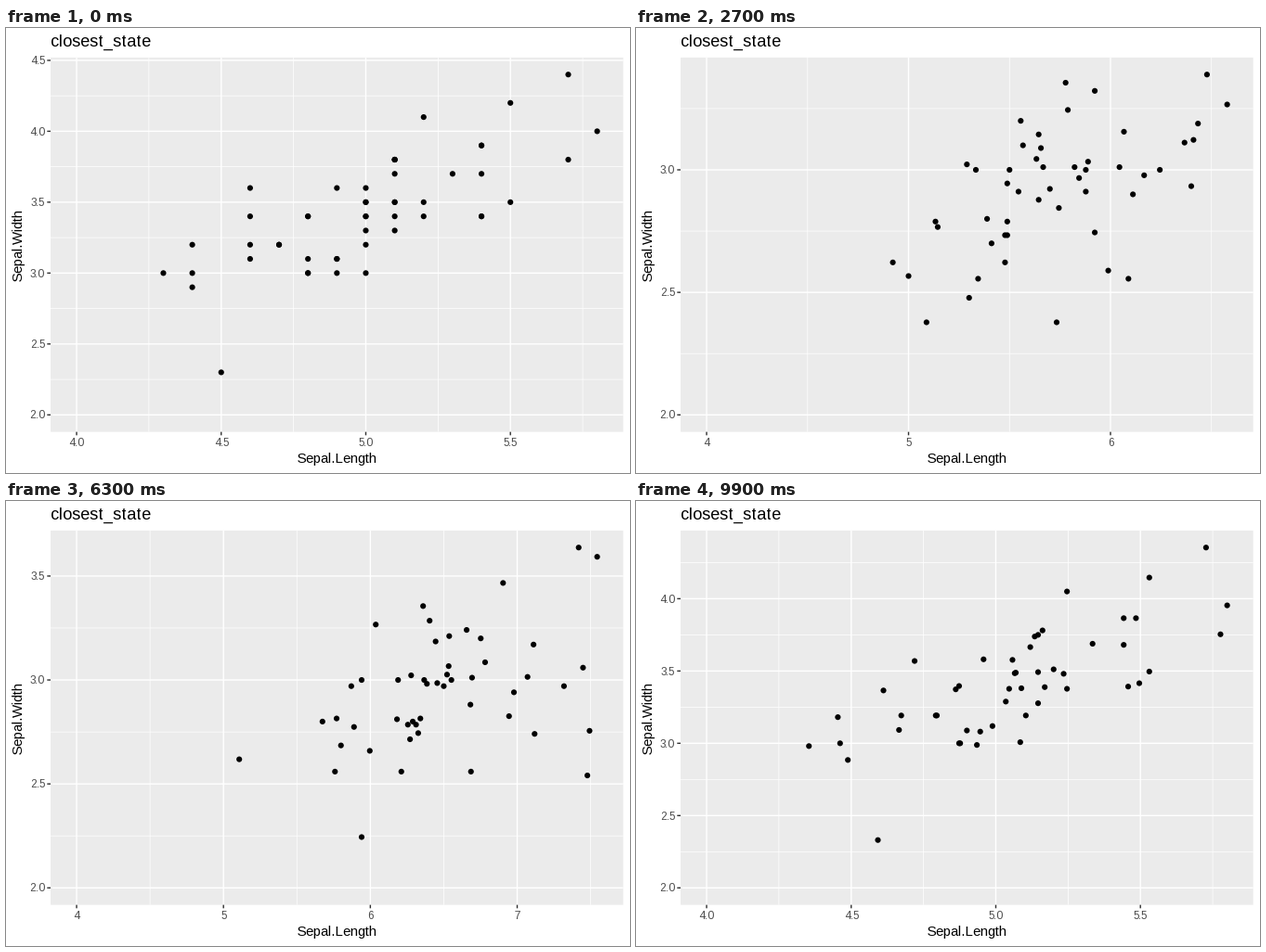
These frames come from a looping animation (672 px wide and 480 px high, 10000 ms). A matplotlib script:

```python
import math

import matplotlib.pyplot as plt
import numpy as np
from matplotlib.animation import FuncAnimation
from matplotlib.collections import LineCollection
from matplotlib.patches import Rectangle

plt.rcParams.update({
    "font.family": "Liberation Sans",
    "text.hinting": "force_autohint",
    "text.hinting_factor": 1,
})

W, H, DPI = 672, 480, 96
LEFT, RIGHT, TOP, BOTTOM = 48, 664.67, 31.85, 435.65
TICK = 3.67
X_MIN, Y_MIN = 4, 2
FRAMES, HOLD, MOVE = 100, 7, 27
PT = 72 / DPI


def flowers(length, width):
    """Sepal sizes in tenths of a centimetre -> (50, 2) array."""
    return np.column_stack([length, width]) / 10


# Fisher's iris measurements
setosa = flowers(
    [51, 49, 47, 46, 50, 54, 46, 50, 44, 49, 54, 48, 48, 43, 58, 57, 54,
     51, 57, 51, 54, 51, 46, 51, 48, 50, 50, 52, 52, 47, 48, 54, 52, 55,
     49, 50, 55, 49, 44, 51, 50, 45, 44, 50, 51, 48, 51, 46, 53, 50],
    [35, 30, 32, 31, 36, 39, 34, 34, 29, 31, 37, 34, 30, 30, 40, 44, 39,
     35, 38, 38, 34, 37, 36, 33, 34, 30, 34, 35, 34, 32, 31, 34, 41, 42,
     31, 32, 35, 36, 30, 34, 35, 23, 32, 35, 38, 30, 38, 32, 37, 33])
versicolor = flowers(
    [70, 64, 69, 55, 65, 57, 63, 49, 66, 52, 50, 59, 60, 61, 56, 67, 56,
     58, 62, 56, 59, 61, 63, 61, 64, 66, 68, 67, 60, 57, 55, 55, 58, 60,
     54, 60, 67, 63, 56, 55, 55, 61, 58, 50, 56, 57, 57, 62, 51, 57],
    [32, 32, 31, 23, 28, 28, 33, 24, 29, 27, 20, 30, 22, 29, 29, 31, 30,
     27, 22, 25, 32, 28, 25, 28, 29, 30, 28, 30, 29, 26, 24, 24, 27, 27,
     30, 34, 31, 23, 30, 25, 26, 30, 26, 23, 27, 30, 29, 29, 25, 28])
virginica = flowers(
    [63, 58, 71, 63, 65, 76, 49, 73, 67, 72, 65, 64, 68, 57, 58, 64, 65,
     77, 77, 60, 69, 56, 77, 63, 67, 72, 62, 61, 64, 72, 74, 79, 64, 63,
     61, 77, 63, 64, 60, 69, 67, 69, 58, 68, 67, 67, 63, 65, 62, 59],
    [33, 27, 30, 29, 30, 30, 25, 29, 25, 36, 32, 27, 30, 25, 28, 32, 30,
     38, 26, 22, 32, 28, 28, 27, 33, 32, 28, 30, 28, 30, 28, 38, 28, 28,
     26, 30, 34, 31, 30, 31, 31, 31, 27, 32, 33, 30, 25, 30, 34, 30])
STATES = [setosa, versicolor, virginica]


def pose(i):
    """Hold each state, then move linearly to the next one."""
    n, k = divmod(i, HOLD + MOVE)
    start = n * (HOLD + MOVE) + HOLD - 1
    move = min(MOVE, FRAMES - start)
    t = max(0, k - HOLD + 1) / move
    return STATES[n] * (1 - t) + STATES[(n + 1) % 3] * t


def tick_step(lo, hi, m=5):
    """Step of the best-scoring labelling (Talbot's extended Wilkinson)."""
    best, best_step = -math.inf, 1
    nice = (1, 5, 2, 2.5, 4, 3)
    for rank, q in enumerate(nice):
        simple = 1 - rank / (len(nice) - 1)
        for step in (q / 10, q):
            for k in range(2, 13):
                first = math.floor(hi / step) - (k - 1)
                last = math.ceil(lo / step)
                for start in range(first, last + 1):
                    a = start * step
                    b = a + (k - 1) * step
                    cover = 1 - 0.5 * ((hi - b) ** 2 + (lo - a) ** 2) / (
                        0.1 * (hi - lo)) ** 2
                    r = 1 / step
                    want = (m - 1) / (max(b, hi) - min(a, lo))
                    dense = 2 - max(r / want, want / r)
                    score = 0.25 * simple + 0.2 * cover + 0.5 * dense + 0.05
                    if score > best:
                        best, best_step = score, step
    return best_step


class Scale:
    """Maps values to pixels with 5 % padding, and finds the breaks."""

    def __init__(self, low, high, p0, p1):
        pad = 0.05 * (high - low)
        self.lo, self.hi, self.p0, self.p1 = low - pad, high + pad, p0, p1
        self.step = tick_step(self.lo, self.hi)

    def __call__(self, v):
        return self.p0 + (v - self.lo) / (self.hi - self.lo) * (self.p1 - self.p0)

    def breaks(self, shift=0.0):
        first = math.ceil(self.lo / self.step - shift)
        last = math.floor(self.hi / self.step - shift)
        return [(n + shift) * self.step for n in range(first, last + 1)]

    def label(self, v):
        return f"{v:.0f}" if self.step % 1 == 0 else f"{v:.1f}"


fig = plt.figure(figsize=(W / DPI, H / DPI), dpi=DPI, facecolor="white")
ax = fig.add_axes([0, 0, 1, 1])
ax.set(xlim=(0, W), ylim=(H, 0))
ax.axis("off")
ax.add_patch(Rectangle((LEFT, TOP), RIGHT - LEFT, BOTTOM - TOP,
                       fc="#EBEBEB", lw=0, snap=False, zorder=0))


def add_lines(color, px, z):
    lines = LineCollection([], colors=color, linewidths=px * PT, zorder=z)
    lines.set_snap(False)
    ax.add_collection(lines, autolim=False)
    return lines


minor = add_lines("white", 0.71, 1)
major = add_lines("white", 1.42, 2)
ticks = add_lines("#333333", 1.42, 2)
dots = ax.scatter(*setosa.T, s=(6.16 * PT) ** 2, c=["black"] * 50,
                  linewidths=0, zorder=3)

mid_x, mid_y = (LEFT + RIGHT) / 2, (TOP + BOTTOM) / 2
ax.text(LEFT, 20, "closest_state", size=13.2, va="baseline")
ax.text(mid_x, 469, "Sepal.Length", size=11, ha="center", va="baseline")
ax.text(18, mid_y, "Sepal.Width", size=11, ha="center", va="baseline",
        rotation=90, rotation_mode="anchor")
labels = []


def grid(xs, ys):
    return ([[(x, TOP), (x, BOTTOM)] for x in xs]
            + [[(LEFT, y), (RIGHT, y)] for y in ys])


def add_label(x, y, s, ha):
    labels.append(ax.text(x, y, s, size=8.8, color="#4D4D4D",
                          ha=ha, va="baseline"))


def update(i):
    pts = pose(i)
    sx = Scale(X_MIN, pts[:, 0].max(), LEFT, RIGHT)
    sy = Scale(Y_MIN, pts[:, 1].max(), BOTTOM, TOP)
    dots.set_offsets(np.column_stack([sx(pts[:, 0]), sy(pts[:, 1])]))

    minor.set_segments(grid(map(sx, sx.breaks(0.5)), map(sy, sy.breaks(0.5))))
    major.set_segments(grid(map(sx, sx.breaks()), map(sy, sy.breaks())))
    ticks.set_segments(
        [[(sx(v), BOTTOM), (sx(v), BOTTOM + TICK)] for v in sx.breaks()]
        + [[(LEFT - TICK, sy(v)), (LEFT, sy(v))] for v in sy.breaks()])

    for text in labels:
        text.remove()
    labels.clear()
    for v in sx.breaks():
        add_label(sx(v), 451, sx.label(v), "center")
    for v in sy.breaks():
        add_label(LEFT - 6.2, sy(v) + 4.2, sy.label(v), "right")


anim = FuncAnimation(fig, update, frames=FRAMES, interval=100,
                     repeat=True, repeat_delay=0, blit=False)
plt.show()
```
